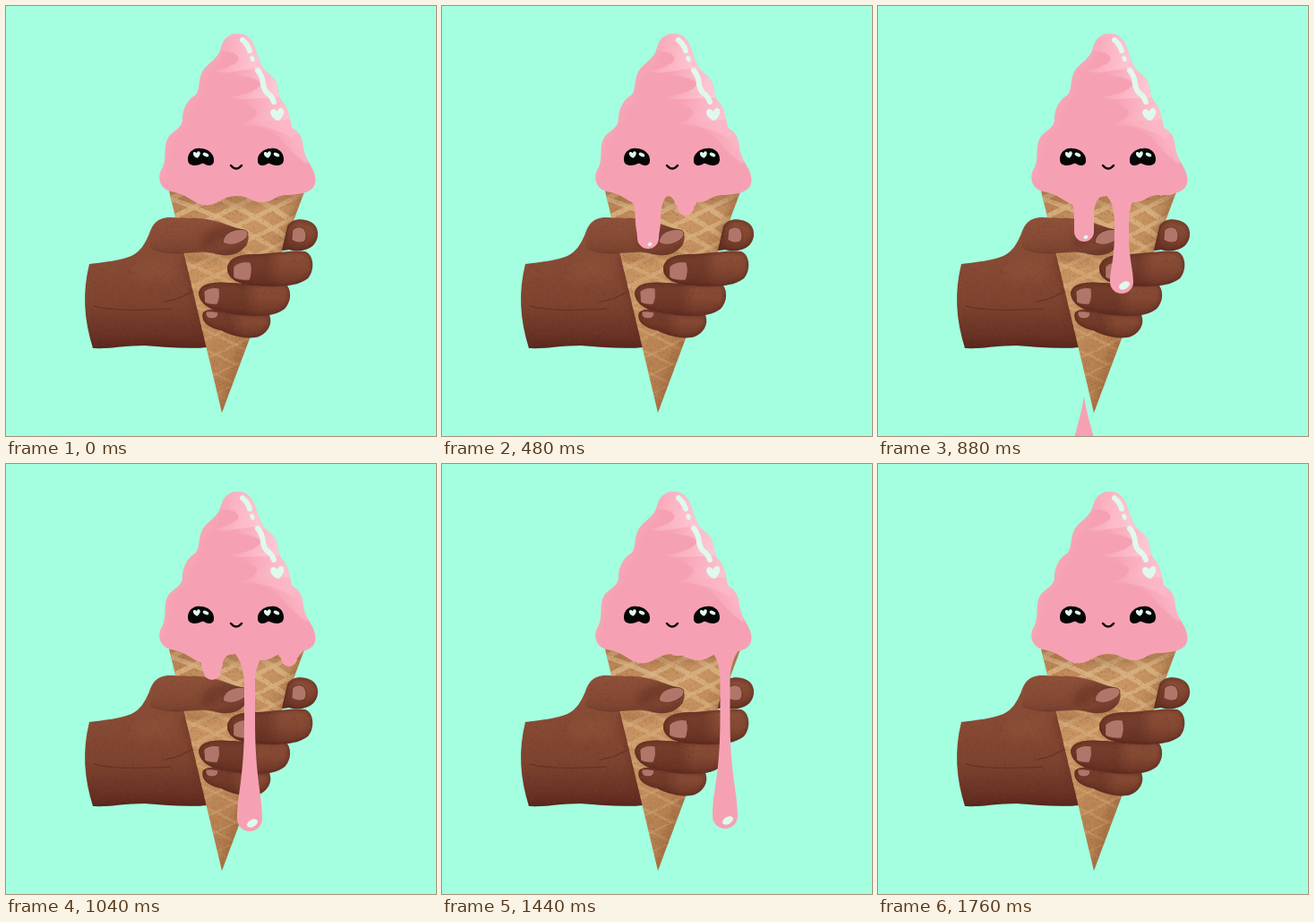
Write an HTML page with a canvas that moves like this. It is 480x480 px and loops after 1.84 s.

```html
<!DOCTYPE html>
<html lang="en">
<head>
<meta charset="utf-8">
<title>Melting ice cream</title>
<style>
html, body { margin: 0; width: 100%; height: 100%; overflow: hidden; background: #a4ffe0; }
canvas { display: block; width: 480px; height: 480px; }
</style>
</head>
<body>
<canvas id="stage" width="480" height="480"></canvas>
<script>
const LOOP = 1840, STEP = 80, PINK = '#f6a1b3', SHINE = '#dff9ee';
const stage = document.getElementById('stage').getContext('2d');
const backdrop = document.createElement('canvas');
backdrop.width = backdrop.height = 480;
let ctx = backdrop.getContext('2d');

const shape = d => new Path2D(d);

function fill(path, paint) {
  ctx.fillStyle = paint;
  ctx.fill(path);
}

function stroke(path, paint, width) {
  ctx.strokeStyle = paint;
  ctx.lineWidth = width;
  ctx.lineCap = ctx.lineJoin = 'round';
  ctx.stroke(path);
}

function gradient(x0, y0, x1, y1, ...colors) {
  const g = ctx.createLinearGradient(x0, y0, x1, y1);
  colors.forEach((c, i) => g.addColorStop(i / (colors.length - 1), c));
  return g;
}

function clipped(path, draw) {
  ctx.save();
  ctx.clip(path);
  draw();
  ctx.restore();
}

function blurred(path, paint, width, blur) {
  ctx.save();
  ctx.filter = `blur(${blur}px)`;
  stroke(path, paint, width);
  ctx.restore();
}

function oval(x, y, rx, ry, angle, color) {
  ctx.beginPath();
  ctx.ellipse(x, y, rx, ry, angle, 0, 7);
  ctx.fillStyle = color;
  ctx.fill();
}

function heart(x, y, s) {
  ctx.save();
  ctx.translate(x, y);
  ctx.rotate(-0.12);
  ctx.scale(s, s);
  fill(shape('M0 7 C-5 4 -8 0 -7 -4 C-6 -7 -2 -7 0 -3 C2 -7 6 -7 7 -4 C8 0 5 4 0 7Z'), SHINE);
  ctx.restore();
}

// Fine paper-like grain from a seeded generator.
let seed = 7;
const random = () => (seed = seed * 16807 % 2147483647) / 2147483647;
function grain(x, y, w, h, dark, light) {
  for (let i = 0; i < w * h / 7; i++) {
    ctx.fillStyle = i % 2 ? dark : light;
    ctx.fillRect(x + random() * w, y + random() * h, 1, 1);
  }
}

const skinGrain = (x, y, w, h) => grain(x, y, w, h, '#4a201822', '#b0745622');

function drawNail(nail) {
  fill(nail, '#b0766a');
  stroke(nail, '#64301f', 0.8);
}

// The fingertip left of the fold lies in shadow.
function drawFinger(path, [x, y, w, h], fold, nail) {
  fill(path, gradient(0, y, 0, y + h, '#8d5039', '#834832', '#6b3426'));
  clipped(path, () => {
    ctx.fillStyle = gradient(fold - 30, 0, fold + 5, 0, '#55261b66', '#55261b66', '#55261b00');
    ctx.fillRect(x, y, w, h);
    blurred(path, '#4f221988', 4, 2);
    skinGrain(x, y, w, h);
  });
  drawNail(nail);
}

function drawPalm() {
  const palm = shape('M93 288C110 286 128 284 140 279C150 274 155 266 160 254C164 243 169 236 184 236L205 237L228 250L240 290L225 381C205 383 180 381 155 379C130 379 116 383 97 382C87 350 85 320 93 288Z');
  fill(palm, gradient(0, 236, 0, 382, '#8d5039', '#874b35', '#7d432f', '#5f2b20'));
  clipped(palm, () => {
    blurred(shape('M95 388Q160 380 230 388'), '#4d1c1688', 12, 5);
    blurred(shape('M202 282L226 378'), '#602b2088', 9, 4);
    blurred(shape('M150 300Q165 292 180 298'), '#9a5b4166', 16, 7);
    stroke(shape('M98 335Q125 342 184 338'), '#6a3426', 1.3);
    stroke(shape('M210 316Q197 327 177 330'), '#6a3426', 1.3);
    skinGrain(86, 235, 154, 148);
  });
}

function drawCone() {
  const cone = shape('M181 202L335 202L241 454Z');
  fill(cone, gradient(190, 230, 310, 320, '#bb8556', '#c99664', '#b37d4e'));
  clipped(cone, () => {
    const line = gradient(0, 205, 0, 440, '#dcb788dd', '#d3a77499', '#cda27255');
    for (let i = 0; i < 13; i++) {
      const y = 200 + i * 22;
      const width = 6 - i * 0.35;
      stroke(shape(`M170 ${y + 22}Q245 ${y - 14} 335 ${y - 58}`), line, width);
      stroke(shape(`M180 ${y - 30}Q260 ${y - 4} 330 ${y + 48}`), line, width);
    }
    blurred(shape('M182 210Q255 226 332 210'), '#93623d77', 10, 4);
    blurred(shape('M335 202L241 454'), '#8c582f77', 10, 5);
    blurred(shape('M204 281Q235 285 266 274'), '#86502f66', 6, 3);
    grain(182, 204, 153, 250, '#75452544', '#efcb9833');
  });
}

function drawThumb() {
  const thumb = shape('M166 246C170 236 187 236 205 237C228 235 249 246 262 249C271 252 273 259 268 267C260 278 249 280 236 277C222 273 210 275 196 276C178 277 168 274 160 270Z');
  fill(thumb, gradient(0, 238, 0, 280, '#8d5039', '#874b35', '#76402f'));
  clipped(thumb, () => {
    blurred(shape('M190 279Q235 287 272 265'), '#5e2c2099', 5, 3);
    blurred(shape('M225 262Q240 250 262 249'), '#5a2a1e77', 16, 5);
    skinGrain(160, 235, 112, 45);
  });
  stroke(shape('M164 271Q178 277 196 276C210 275 222 273 236 277C251 280 264 274 269 265'), '#67342766', 1.2);
  drawNail(shape('M242 264Q243 253 256 250Q268 248 270 253Q271 259 261 264Q250 269 242 264Z'));
}

function drawFingers() {
  drawFinger(shape('M314 246C318 238 330 236 340 241C350 246 350 259 344 266C338 273 325 275 316 272L308 273Z'),
    [308, 237, 41, 37], 322, shape('M320 250Q326 244 333 249Q337 257 333 263Q325 266 319 261Z'));
  drawFinger(shape('M220 342C228 335 250 340 270 344L294 345C298 355 292 365 282 369C270 373 252 368 240 362C225 359 217 352 220 342Z'),
    [218, 337, 79, 35], 262, shape('M223 341Q230 340 237 342Q237 349 230 349Q222 349 223 341Z'));
  drawFinger(shape('M215 320C217 310 230 307 250 309C275 310 300 313 312 310C319 316 319 330 311 338C300 347 280 347 262 345C238 342 216 338 215 320Z'),
    [214, 307, 104, 40], 278, shape('M221 319Q226 313 238 315Q240 325 236 333Q227 334 222 331Z'));
  drawFinger(shape('M247 292C249 280 262 277 280 277C300 276 322 272 334 274C344 278 345 295 337 304C325 314 300 314 280 312C262 312 246 305 247 292Z'),
    [246, 273, 98, 41], 303, shape('M254 291Q261 284 273 286Q276 296 272 306Q260 307 254 303Z'));
}

function drawIce() {
  const ice = shape('M260 31C250 30 243 36 240 47C237 59 226 63 220 72C214 82 217 92 212 99C203 104 197 115 197 126C197 137 186 139 181 147C175 157 180 168 175 180C168 190 171 204 184 207C203 210 207 219 219 222C235 225 239 213 255 212C271 211 273 219 286 219C299 219 299 211 315 211C335 210 348 206 345 190C343 179 335 174 332 160C331 148 329 142 319 136C316 124 316 114 307 105C302 96 305 85 295 77C284 69 284 62 280 54C277 40 270 31 260 31Z');
  fill(ice, PINK);
  clipped(ice, () => {
    fill(shape('M236 50Q258 50 260 59Q257 67 232 73Q251 76 276 77L295 80L285 40L262 25L242 31Z'),
      gradient(240, 48, 282, 54, '#f9a9ba', '#ffc5d1'));
    fill(shape('M235 76Q278 77 285 86Q282 97 248 102Q270 105 290 108L315 106L302 76L276 70Z'),
      gradient(250, 84, 300, 96, '#f6a1b3', '#ffc8d4'));
    fill(shape('M243 105Q274 108 280 117Q282 125 263 132Q298 133 322 149L325 125L308 102Z'),
      gradient(263, 115, 317, 123, '#f6a1b3', '#ffc5d1'));
    fill(shape('M265 132Q295 134 309 151Q319 164 335 176L346 165L319 126Z'),
      gradient(279, 155, 325, 134, '#f6a1b300', '#fdb8c7'));
    blurred(shape('M240 47C237 67 217 70 215 92C212 109 197 112 197 130C178 141 179 165 172 190'), '#fbb0c155', 7, 3);
  });
  stroke(shape('M264 38Q270 43 272 50'), SHINE, 6);
  oval(275, 59, 2.5, 3.5, -0.4, SHINE);
  stroke(shape('M281 72Q287 79 287 88Q289 96 294 99Q298 103 299 107'), SHINE, 6);
  heart(303, 121, 1.05);
}

function drawFace() {
  const eye = shape('M203 171C203 163 210 158 217 159C226 159 233 166 232 173C232 179 225 179 221 176C218 175 217 178 211 178C206 178 203 176 203 171Z');
  fill(eye, '#050505');
  ctx.save();
  ctx.translate(513, 0);
  ctx.scale(-1, 1);
  fill(eye, '#050505');
  ctx.restore();
  for (const x of [213, 292]) {
    heart(x, 166, 0.55);
    oval(x + 10, 166, 3.5, 2, 0.45, SHINE);
  }
  stroke(shape('M251 178Q257 185 263 178'), '#100808', 2.5);
}

drawPalm();
drawCone();
drawThumb();
drawFingers();
drawIce();
drawFace();

// stub keys: time, tip, neck half-width, tip radius; fall keys: time, tail, bottom
const drips = [
  { x: 230, base: 214, half: 24, r: 17,
    stub: [[80, 222, 14, 10], [320, 238, 14, 12], [480, 271, 14, 12], [640, 349, 10, 15], [720, 399, 9, 17],
           [800, 295, 9, 8], [880, 263, 11, 11], [1200, 219, 13, 8]],
    fall: [[800, 348, 459], [880, 436, 538], [960, 535, 640]] },
  { x: 272, base: 214, half: 20, r: 13,
    stub: [[320, 218, 13, 8], [480, 234, 12, 9], [720, 269, 10, 11], [880, 321, 8, 13], [1040, 410, 6, 14],
           [1120, 282, 7, 7], [1200, 255, 9, 9], [1440, 216, 11, 7]],
    fall: [[1120, 374, 465], [1200, 459, 548], [1280, 560, 650]] },
  { x: 316, base: 211, half: 17, r: 14,
    stub: [[880, 212, 10, 7], [1040, 226, 11, 9], [1200, 262, 10, 10], [1360, 352, 7, 13], [1440, 407, 5.5, 14],
           [1520, 267, 6, 6], [1600, 239, 9, 8], [1680, 213, 10, 6]],
    fall: [[1520, 353, 460], [1600, 442, 540], [1680, 540, 640]] }
];

function sample(keys, t) {
  const i = keys.findIndex(k => k[0] >= t);
  if (i < 0 || t < keys[0][0]) return null;
  if (i === 0) return keys[0].slice(1);
  const a = keys[i - 1], b = keys[i], p = (t - a[0]) / (b[0] - a[0]);
  return a.slice(1).map((v, k) => v + (b[k + 1] - v) * p);
}

function drawStub({ x, base, half }, [tip, neck, radius]) {
  const r = Math.min(radius, tip - base);
  if (r <= 0) return;
  const cy = tip - r, length = cy - base;
  const flare = base + Math.min(length * 0.6, 28);
  const swell = Math.max(flare, base + length * 0.4);
  ctx.beginPath();
  ctx.moveTo(x - half, base - 5);
  ctx.bezierCurveTo(x - neck - 5, base, x - neck, base + length * 0.1, x - neck, flare);
  ctx.lineTo(x - neck, swell);
  ctx.bezierCurveTo(x - neck, base + length * 0.75, x - r, cy - length * 0.15, x - r, cy);
  ctx.arc(x, cy, r, Math.PI, 0, true);
  ctx.bezierCurveTo(x + r, cy - length * 0.15, x + neck, base + length * 0.75, x + neck, swell);
  ctx.lineTo(x + neck, flare);
  ctx.bezierCurveTo(x + neck, base + length * 0.1, x + neck + 5, base, x + half, base - 5);
  ctx.fillStyle = PINK;
  ctx.fill();
  if (tip > 295) oval(x + 3, tip - 9, 6.5, 4, -0.5, SHINE);
  else if (tip > 254) oval(x + 2, tip - 5, 2.5, 2, -0.5, SHINE);
}

function drawDrop(x, r, [tail, bottom]) {
  const cy = bottom - r;
  ctx.beginPath();
  ctx.moveTo(x, tail);
  ctx.bezierCurveTo(x - 4, tail + 28, x - r, cy - 28, x - r, cy);
  ctx.arc(x, cy, r, Math.PI, 0, true);
  ctx.bezierCurveTo(x + r, cy - 28, x + 4, tail + 28, x, tail);
  ctx.fillStyle = PINK;
  ctx.fill();
  oval(x + 3, bottom - 9, 6.5, 4, -0.5, SHINE);
}

function frame() {
  const t = Math.floor(performance.now() % LOOP / STEP) * STEP;
  ctx = stage;
  ctx.fillStyle = '#a4ffe0';
  ctx.fillRect(0, 0, 480, 480);
  ctx.drawImage(backdrop, 0, 0);
  for (const drip of drips) {
    const stub = sample(drip.stub, t), fall = sample(drip.fall, t);
    if (stub) drawStub(drip, stub);
    if (fall) drawDrop(drip.x, drip.r, fall);
  }
  requestAnimationFrame(frame);
}
frame();
</script>
</body>
</html>
```
